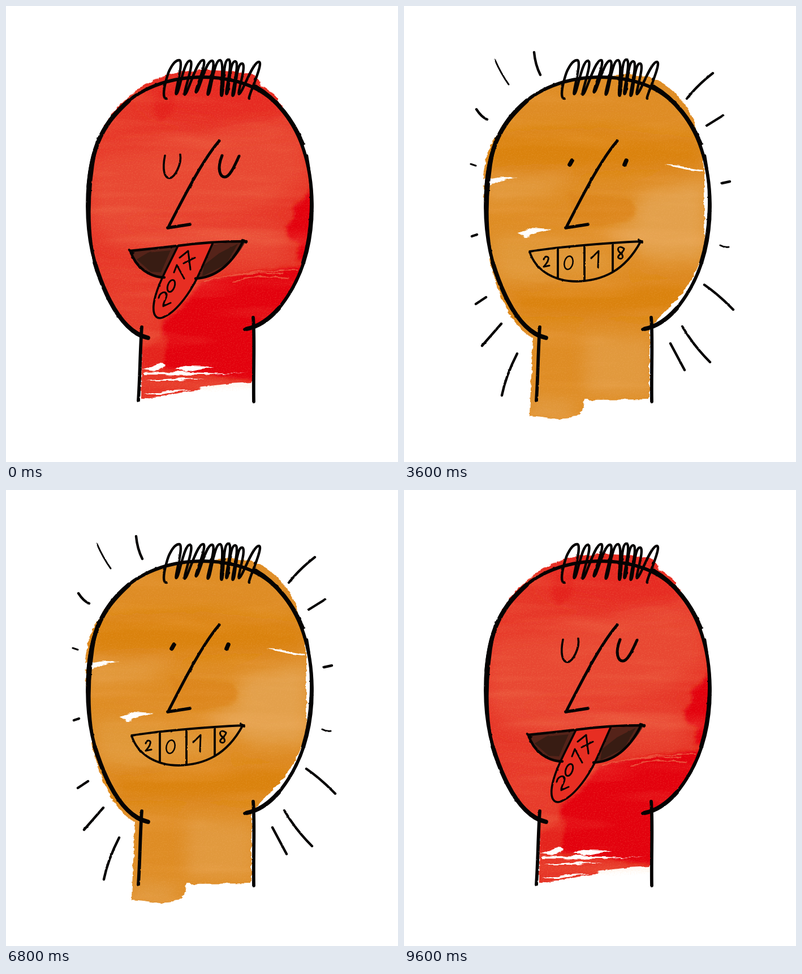
Animation of 693 by 808 pixels, one loop 10000 ms. Source, as an HTML page:

```html
<!DOCTYPE html>
<html lang="en">
<head>
<meta charset="utf-8">
<title>Two faces</title>
<style>
  html, body { margin: 0; width: 100%; height: 100%; overflow: hidden; background: #fff; }
  svg { display: block; width: 100%; height: 100%; }
  .ink { fill: none; stroke: #050303; stroke-width: 4.4; stroke-linecap: round; stroke-linejoin: round; }
  .thin { stroke-width: 3; }
  .firm { stroke-width: 5.8; }
  .bold { stroke-width: 7.5; }
  .white { fill: #fff; }
</style>
</head>
<body>
<svg viewBox="0 0 693 808">
  <defs>
    <!-- Dry brush: ragged edges, pale horizontal streaks and fine grain -->
    <filter id="brush" filterUnits="userSpaceOnUse" x="0" y="0" width="693" height="808" color-interpolation-filters="sRGB">
      <feTurbulence type="fractalNoise" baseFrequency=".05 .12" numOctaves="3" seed="4" result="wobble"/>
      <feDisplacementMap in="SourceGraphic" in2="wobble" scale="7" xChannelSelector="R" yChannelSelector="G" result="paint"/>
      <feTurbulence type="fractalNoise" baseFrequency=".004 .028" numOctaves="3" seed="8"/>
      <feColorMatrix values="0 0 0 0 1  0 0 0 0 .75  0 0 0 0 .5  .45 0 0 0 -.22" result="streaks"/>
      <feTurbulence type="fractalNoise" baseFrequency=".45" numOctaves="2" seed="2"/>
      <feColorMatrix values="0 0 0 0 1  0 0 0 0 .75  0 0 0 0 .5  .4 0 0 0 -.19" result="grain"/>
      <feComposite in="streaks" in2="paint" operator="atop" result="washed"/>
      <feComposite in="grain" in2="washed" operator="atop"/>
    </filter>
    <filter id="rough" filterUnits="userSpaceOnUse" x="0" y="0" width="693" height="808" color-interpolation-filters="sRGB">
      <feTurbulence type="fractalNoise" baseFrequency=".12" numOctaves="2" seed="5"/>
      <feDisplacementMap in="SourceGraphic" scale="2" xChannelSelector="R" yChannelSelector="G"/>
    </filter>
    <filter id="soft" x="-40%" y="-40%" width="180%" height="180%"><feGaussianBlur stdDeviation="14"/></filter>
    <filter id="edge" x="-20%" y="-20%" width="140%" height="140%"><feGaussianBlur stdDeviation="3"/></filter>

    <clipPath id="redShape">
      <path d="M170 224C182 187 222 148 270 128C320 109 385 109 441 123L450 140C474 153 490 174 498 198C528 235 541 290 541 350C541 425 522 478 492 520C476 545 460 560 440 569L435 668L400 674L350 678L300 687L239 696L240 586C215 574 193 540 182 520C158 475 145 415 145 355C145 300 153 255 170 224Z"/>
    </clipPath>
    <clipPath id="orangeShape">
      <path d="M140 300C144 270 154 238 178 208C212 158 270 130 345 126C385 118 436 120 464 142C490 160 510 187 516 218C526 245 531 270 531 300L531 430C520 470 500 505 450 553L434 574L434 697L318 698C321 712 311 726 292 731C268 735 244 726 222 726L228 588C208 580 184 548 170 510C154 470 146 425 143 370Z"/>
    </clipPath>

    <g id="features" class="ink">
      <path class="firm" d="M248 588C226 584 203 560 184 523C158 473 144 415 144 355C144 300 152 250 178 210C212 158 270 127 345 126C400 126 445 140 478 173C520 215 540 280 541 350C542 420 525 475 494 520C475 548 455 566 422 573"/>
      <path class="bold" d="M251 588C226 582 203 560 184 523C173 502 164 478 157 455M146 320C151 265 162 235 180 209C190 194 203 181 217 168M441 143C480 166 508 204 524 244M426 572C447 568 466 554 482 536"/>
      <path d="M160 470C142 400 144 320 162 235M532 265C544 330 541 400 524 455"/>
      <path id="hair"/>
      <path style="stroke-width:5" d="M377 239C350 270 321 325 288 390"/>
      <path class="firm" d="M286 393L325 387M240 569C237 610 237 655 234 699M437 552C440 590 437 645 438 701"/>
    </g>
  </defs>

  <rect class="white" width="693" height="808"/>

  <g id="redFace">
    <g filter="url(#brush)">
      <g clip-path="url(#redShape)">
        <rect x="100" y="80" width="480" height="640" fill="#e63527"/>
        <g filter="url(#soft)">
          <path fill="#e62b20" d="M230 105H460L510 200L380 210L250 185Z"/>
          <path fill="#e84632" d="M150 265L350 235L530 222V310L450 360L150 390Z"/>
          <path fill="#e84935" d="M370 215L530 200V215L380 225Z"/>
          <path fill="#e84431" d="M150 385L480 390L500 450L430 460L190 425Z"/>
          <path fill="#e73b2b" d="M165 480L250 490L280 560L240 590L200 560Z"/>
        </g>
        <g fill="#e30611" filter="url(#edge)">
          <path d="M345 490L430 472L545 458V520L455 580L440 664L265 640L278 595L276 560L310 535Z"/>
          <path d="M545 315L524 345L506 355L510 375L494 392L500 414L520 420L513 450H550Z"/>
          <path fill="#e4211a" d="M262 162L300 145L297 185L274 205L262 190Z"/>
          <path fill="#e4211a" d="M238 610L285 585L275 650L238 640Z"/>
        </g>
        <path fill="none" stroke="#ea503b" stroke-width="2" d="M350 488Q430 466 515 469M365 484Q430 470 490 474M400 488Q450 475 500 482"/>
      </g>
      <g class="white">
        <path d="M241 645L275 631L283 639L262 648Z"/>
        <path d="M298 643L322 638L369 639L318 648Z"/>
        <path d="M244 650L300 648L380 651L428 649L350 654L244 653Z"/>
        <path d="M245 664L310 659L350 660L290 664Z"/>
        <path d="M340 676L395 669L436 667V680L350 684Z"/>
        <path d="M244 688L300 680L330 679L270 688Z"/>
      </g>
    </g>
    <g filter="url(#rough)">
      <path fill="#552319" d="M220 434L424 417C400 460 370 482 333 483L282 482C250 478 228 462 220 434Z"/>
      <path fill="#381c13" d="M231 449L251 437L291 433L274 472L256 471Z M350 459L377 438L410 421L389 458L347 479Z"/>
      <path fill="#e72e22" d="M304 425C285 465 264 500 261 530C259 552 269 557 281 550C303 540 328 505 342 473L366 419Z"/>
      <use href="#features"/>
      <g class="ink">
        <path style="stroke-width:3.6" d="M281 265C276 290 280 305 289 305C299 304 311 279 308 263"/>
        <path style="stroke-width:5" d="M382 265C372 290 379 303 387 303C396 303 405 281 412 266"/>
        <path d="M219 434L303 425Q360 417 425 417M220 434C229 464 254 480 280 481M335 483C370 481 398 459 418 419M218 432L224 438M418 414L425 419"/>
        <path style="stroke-width:3.6" d="M304 425C285 465 264 500 261 530C259 552 269 557 281 550C303 540 328 505 342 473L366 419"/>
        <path class="thin" d="M270 517C272 507 283 504 284 511C285 519 278 522 278 532L291 526M297 472L302 459L315 483M307 446L322 434L326 467M314 456L334 446"/>
        <ellipse class="thin" cx="292" cy="496" rx="6" ry="11" transform="rotate(20 292 496)"/>
      </g>
    </g>
  </g>

  <g id="orangeFace" visibility="hidden">
    <g filter="url(#brush)">
      <g clip-path="url(#orangeShape)">
        <rect x="100" y="80" width="480" height="670" fill="#de8c24"/>
        <g filter="url(#soft)">
          <path fill="#da820f" d="M140 222L350 216L530 235V285L320 295L145 290Z"/>
          <path fill="#e29a3e" d="M140 305L300 300L250 335L145 350Z"/>
          <path fill="#e3a04c" d="M410 335L535 305V450L440 450L350 405L410 380Z"/>
          <path fill="#e09839" d="M160 405L330 425L390 465L210 490L160 475Z"/>
          <path fill="#da820f" d="M175 505L530 480L480 550L200 550Z"/>
          <path fill="#e1993c" d="M320 580L440 590V690H320Z M222 690L310 700L295 735H222Z"/>
        </g>
        <path fill="#dc861a" filter="url(#edge)" d="M290 330L395 342Q418 355 405 372Q385 387 335 390L300 380Z"/>
      </g>
      <g class="white">
        <path d="M461 281L490 283L529 290L528 294L495 289Z"/>
        <path d="M140 308L174 303L201 304L170 309L152 318L140 318Z"/>
        <path d="M202 402L226 393L262 395L235 401L216 410Z"/>
      </g>
    </g>
    <g filter="url(#rough)">
      <use href="#features"/>
      <g class="ink">
        <path class="bold" d="M297 274L293 281M393 274L390 281"/>
        <path style="stroke-width:3.8" d="M222 435C265 428 350 420 421 417M222 435C232 468 265 488 305 488C350 487 390 470 418 418M272 431L272 482M319 424L319 486M369 421L369 471M415 414L421 419"/>
        <path class="thin" d="M247 449C249 442 257 443 255 449C254 455 250 458 247 462L257 460M331 447L344 434L343 463M389 430C381 423 374 431 382 437C390 443 386 450 380 447C374 443 389 437 389 430"/>
        <ellipse style="stroke-width:2.5" cx="291" cy="455" rx="7.5" ry="12" transform="rotate(12 291 455)"/>
        <path d="M230 82Q232 104 241 122M128 183Q137 197 147 201M127 528L145 516M138 602L172 563M173 690Q180 655 200 616M546 119Q520 139 500 164M564 194L535 212M576 311L562 314M531 494Q557 512 582 538M492 568Q512 602 541 631M471 598L496 645M120 408L129 405"/>
        <path class="thin" d="M161 96Q171 119 185 139M118 280L127 283M559 424Q566 428 574 427"/>
      </g>
    </g>
  </g>
</svg>
<script>
  const byId = id => document.getElementById(id);

  // Each curl rises to a peak and drops to a foot: [peakX, peakY, footX, footY]
  const curls = [
    [306, 96, 301, 156], [325, 97, 316, 157], [348, 96, 336, 153], [364, 97, 357, 157],
    [378, 96, 381, 159], [393, 95, 390, 156], [405, 98, 401, 159], [417, 102, 412, 156], [447, 99, 430, 164]
  ];
  let [x, y] = [284, 164];
  let hair = `M${x} ${y}C272 166 285 120 290 112`;
  curls.forEach(([px, py, fx, fy], i) => {
    hair += i ? `C${x + 5} ${y} ${px - 11} ${py} ${px} ${py}` : `Q298 96 ${px} ${py}`;
    hair += `C${px + 10} ${py} ${fx - 4} ${fy} ${fx} ${fy}`;
    [x, y] = [fx, fy];
  });
  byId('hair').setAttribute('d', hair);

  const LOOP = 10000, HOLD = 400;
  let shown = 0;
  function tick() {
    const face = Math.floor(performance.now() % LOOP / HOLD) % 2;
    if (face !== shown) {
      byId('redFace').setAttribute('visibility', face ? 'hidden' : 'visible');
      byId('orangeFace').setAttribute('visibility', face ? 'visible' : 'hidden');
      shown = face;
    }
    requestAnimationFrame(tick);
  }
  tick();
</script>
</body>
</html>
```
